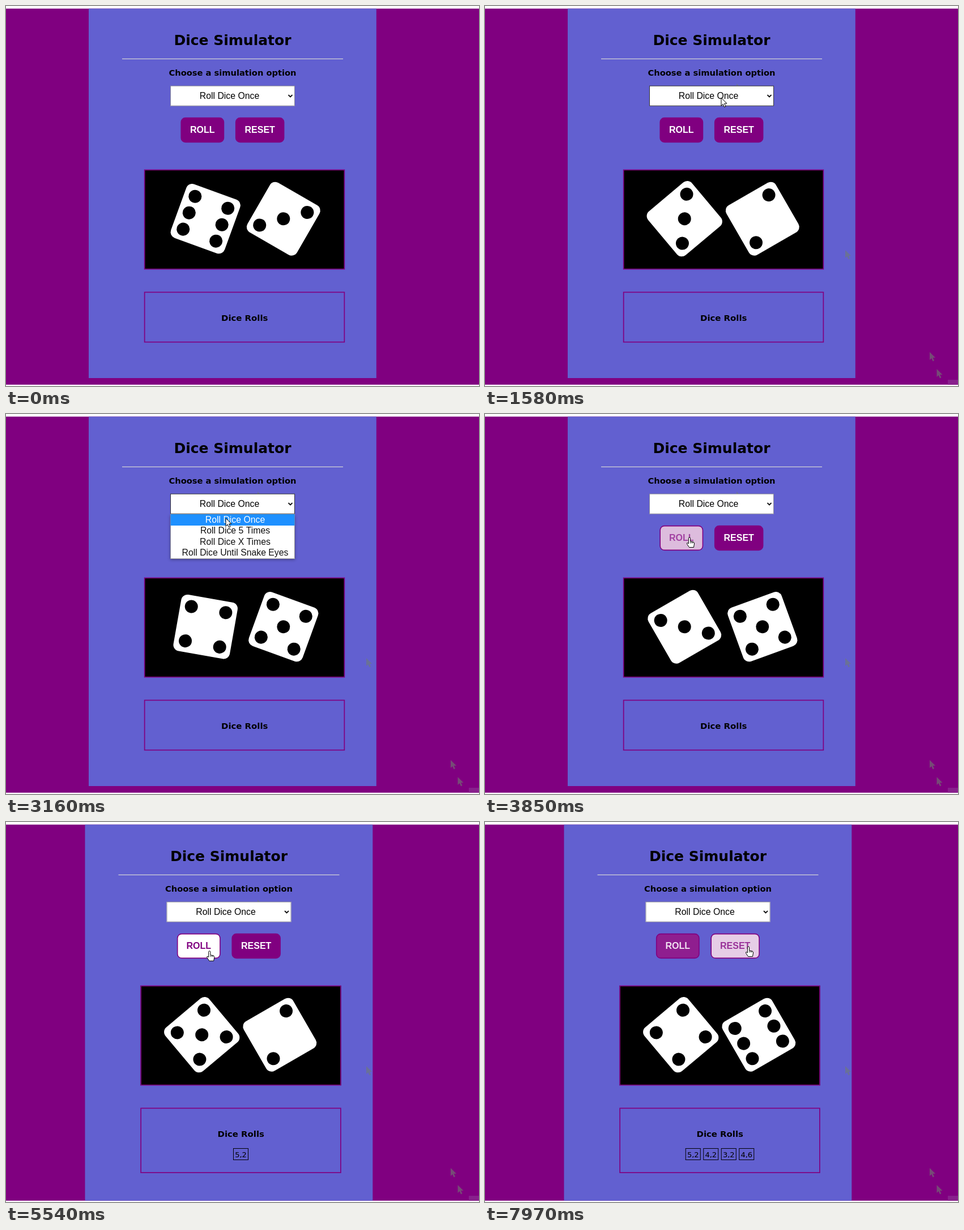
An HTML page with a canvas for the animation above (8000 ms loop, 835 by 671 pixels).

```html
<!DOCTYPE html>
<html lang="en">
<head>
<meta charset="utf-8">
<title>Dice Simulator</title>
<style>
  html, body { margin: 0; width: 100%; height: 100%; overflow: hidden; background: #fff; }
  canvas { display: block; }
</style>
</head>
<body>
<canvas id="stage" width="835" height="671"></canvas>
<script>
const ctx = document.getElementById('stage').getContext('2d');
const LOOP = 8000, STEP = 68.6;
const MENU_OPENS = 2740, MENU_CLOSES = 3430;
const ROLL_ENTERED = 3720, ROLL_LEFT = 7790, RESET_ENTERED = 7820;
const PURPLE = '#800080', PANEL = '#6260d0';
const HEADING = '"DejaVu Sans", sans-serif', CONTROL = '"Liberation Sans", Arial, sans-serif';

const rolls = [
  { at: 4260, dice: [5, 2] }, { at: 6150, dice: [4, 2] },
  { at: 6810, dice: [3, 2] }, { at: 7350, dice: [4, 6] }
];
const clicks = [MENU_OPENS, MENU_CLOSES, ...rolls.map(r => r.at)];
const options = ['Roll Dice Once', 'Roll Dice 5 Times', 'Roll Dice X Times', 'Roll Dice Until Snake Eyes'];

// Key points of the pointer's tip: time, x, y
const pointerPath = [
  [280, 810, 671], [420, 785, 611], [640, 636, 431], [950, 444, 137], [1600, 416, 163],
  [1950, 358, 187], [2260, 381, 158], [3150, 388, 184], [MENU_CLOSES, 388, 185], [3800, 361, 218],
  [5330, 360, 218], [5540, 359, 231], [5950, 355, 219], [7620, 355, 219], [7950, 465, 220]
];
// Moments at which the pointer leaves a faint copy behind
const trailTimes = [350, 420, 640, 950];

const arrow = new Path2D('M0 0V14L3.2 11L5.5 16.3L8 15.2L5.7 10H10Z');
const hand = new Path2D('M-1.6 1.6A1.6 1.6 0 0 1 1.6 1.6V7L7.4 8.4Q8.9 9 8.6 11L7.4 17.5H-.5L-4.4 11.5Q-5 9.2-3.2 9.6L-1.6 11Z');

const clamp = v => Math.max(0, Math.min(1, v));
const ease = p => 1 - (1 - clamp(p)) ** 2.32;
const fade = (t, start) => ease((t - start) / 300);
const purpleToWhite = h => `rgb(${128 + 127 * h},${255 * h},${128 + 127 * h})`;
const tumble = (n, seed, stride) => 1 + Math.floor(6 * ((seed + stride * n) % 1));

function pointerAt(t) {
  const next = pointerPath.findIndex(p => p[0] > t);
  if (next < 1) return pointerPath.at(next).slice(1);
  const [t0, x0, y0] = pointerPath[next - 1], [t1, x1, y1] = pointerPath[next];
  const p = (t - t0) / (t1 - t0);
  return [x0 + (x1 - x0) * p, y0 + (y1 - y0) * p];
}

function fillBox(left, top, right, bottom, color) {
  ctx.fillStyle = color;
  ctx.fillRect(left, top, right - left, bottom - top);
}

function frame(left, top, right, bottom, width, color) {
  ctx.strokeStyle = color;
  ctx.lineWidth = width;
  ctx.strokeRect(left + width / 2, top + width / 2, right - left - width, bottom - top - width);
}

function label(text, x, baseline, font, color = '#000') {
  ctx.font = font;
  ctx.fillStyle = color;
  ctx.fillText(text, x, baseline);
}

function drawShape(path, x, y, fill, stroke) {
  ctx.save();
  ctx.translate(x, y);
  ctx.fillStyle = fill;
  ctx.fill(path);
  if (stroke) {
    ctx.strokeStyle = stroke;
    ctx.lineWidth = 1;
    ctx.stroke(path);
  }
  ctx.restore();
}

function disc(x, y, radius, color) {
  ctx.fillStyle = color;
  ctx.beginPath();
  ctx.arc(x, y, radius, 0, Math.PI * 2);
  ctx.fill();
}

function pips(face) {
  const spots = face % 2 ? [[0, 0]] : [];
  if (face > 1) spots.push([1, -1], [-1, 1]);
  if (face > 3) spots.push([-1, -1], [1, 1]);
  if (face > 5) spots.push([-1, 0], [1, 0]);
  return spots;
}

function drawDie(x, y, degrees, face) {
  ctx.save();
  ctx.translate(x, y);
  ctx.rotate(degrees * Math.PI / 180);
  ctx.fillStyle = '#fff';
  ctx.beginPath();
  ctx.roundRect(-50.5, -50.5, 101, 101, 11);
  ctx.fill();
  for (const [px, py] of pips(face)) disc(px * 30.8, py * 30.8, 11.5, '#000');
  ctx.restore();
}

function drawButton(text, left, right, hover) {
  ctx.fillStyle = purpleToWhite(hover);
  ctx.strokeStyle = PURPLE;
  ctx.lineWidth = 1.6;
  ctx.beginPath();
  ctx.roundRect(left + .8, 197.6, right - left - 1.6, 42.8, 7.5);
  ctx.fill();
  ctx.stroke();
  label(text, (left + right) / 2, 224, `bold 16px ${CONTROL}`, purpleToWhite(1 - hover));
}

function drawSelect(active) {
  fillBox(290, 141, 510, 176.5, '#fff');
  frame(290, 140.7, 510, 176.7, 1, active ? '#333' : '#8a8a96');
  label(options[0], 394.5, 164, `15.8px ${CONTROL}`);
  ctx.strokeStyle = '#111';
  ctx.lineWidth = 1.8;
  ctx.stroke(new Path2D('M498.5 157L502 160.5L505.5 157'));
}

function drawOptions() {
  ctx.save();
  ctx.shadowColor = 'rgba(0,0,0,.35)';
  ctx.shadowBlur = 5;
  ctx.shadowOffsetY = 2;
  fillBox(290, 176.5, 510, 256, '#fff');
  ctx.restore();
  frame(290, 176, 510, 256, .8, '#777');
  fillBox(290.5, 177, 509.5, 197, '#1e90ff');
  options.forEach((text, i) =>
    label(text, 404.5, 191.5 + 19.5 * i, `15.8px ${CONTROL}`, i ? '#111' : '#fff'));
}

function drawDice(step, result) {
  const turns = Math.max(0, Math.min(84, Math.floor((step - 38) / 50)));
  const [first, second] = result ? result.dice
    : [tumble(turns, .95, .28333), tumble(turns, .459, .4253)];
  fillBox(244, 289, 598, 465, '#000');
  frame(243.8, 288.6, 598.2, 465.4, 1.7, PURPLE);
  drawDie(352.2, 375.7, 20 + 10 * turns, first);
  drawDie(489.8, 375.7, 30 + 10 * turns, second);
}

function drawRolls(shown) {
  frame(243.8, 504.6, 598.2, shown.length ? 620 : 594.3, 1.7, PURPLE);
  label('Dice Rolls', 421.2, 555.5, `bold 14.9px ${HEADING}`);
  shown.forEach(({ dice }, i) => {
    const x = 421 + 31.5 * (i - shown.length / 2) + 2.25;
    frame(x, 576, x + 27, 597, 1, '#000');
    label(dice.join(), x + 13.5, 591.5, `13px ${HEADING}`);
  });
}

function drawPointer(t, step) {
  const [x, y] = pointerAt(step);
  if (clicks.some(at => t >= at - 130 && t < at)) disc(x - 1, y, 10, 'rgba(245,240,50,.75)');
  if (t < ROLL_ENTERED) return drawShape(arrow, x, y, '#fff', '#000');
  drawShape(hand, x, y, '#fff', '#000');
  ctx.lineWidth = .8;
  ctx.strokeStyle = '#000';
  for (const knuckle of [1.6, 4, 6.2]) {
    ctx.beginPath();
    ctx.moveTo(x + knuckle, y + 7.5);
    ctx.lineTo(x + knuckle, y + 10.5);
    ctx.stroke();
  }
}

function drawTrails(step) {
  for (const time of trailTimes)
    if (step > time) drawShape(arrow, ...pointerAt(time), 'rgba(112,125,112,.6)');
}

function draw(t) {
  const step = Math.floor(t / STEP) * STEP;
  const shown = rolls.filter(r => t >= r.at);
  const shift = shown.length ? -6.5 : 0;

  fillBox(0, 0, 835, 671, '#fff');
  fillBox(0, 4.6, 835, 668.7, PURPLE);
  if (t >= 70) fillBox(817, 660, 835, 668.7, '#88208c');

  // The page recentres once the list of rolls makes it taller
  ctx.save();
  ctx.translate(shift, 0);
  fillBox(146, 4.6, 653.8, shown.length ? 668.7 : 657, PANEL);
  label('Dice Simulator', 400, 69, `bold 25px ${HEADING}`);
  fillBox(205, 92.8, 595, 93.9, '#e0e0d8');
  label('Choose a simulation option', 400, 123, `bold 14.65px ${HEADING}`);
  ctx.restore();

  drawTrails(step);

  ctx.save();
  ctx.translate(shift, 0);
  drawSelect(t >= 950 && t < MENU_CLOSES);
  drawButton('ROLL', 308.4, 385.2, fade(t, ROLL_ENTERED) - fade(t, ROLL_LEFT));
  drawButton('RESET', 404.9, 491.4, fade(t, RESET_ENTERED));
  drawDice(step, shown.at(-1));
  drawRolls(shown);
  if (t >= MENU_OPENS && t < MENU_CLOSES) drawOptions();
  ctx.restore();

  drawPointer(t, step);
}

function tick() {
  draw(performance.now() % LOOP);
  requestAnimationFrame(tick);
}
ctx.textAlign = 'center';
tick();
</script>
</body>
</html>
```
